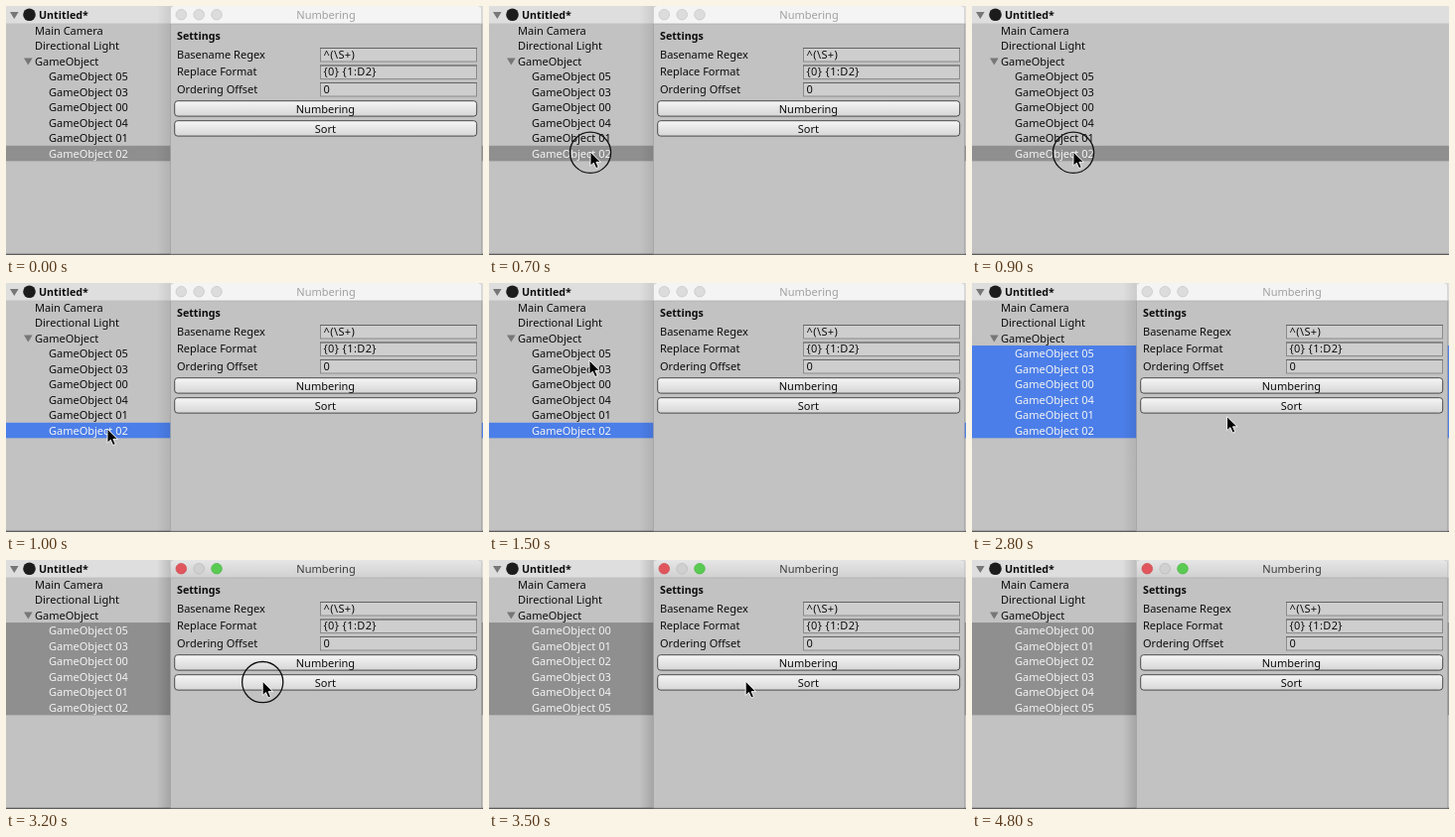
An HTML page for the animation above (5000 ms loop, 480 by 251 pixels).

```html
<!DOCTYPE html>
<html lang="en">
<head>
<meta charset="utf-8">
<title>Numbering and sorting objects</title>
<style>
  html, body { margin: 0; width: 100%; height: 100%; overflow: hidden; background: #c2c2c2; }
  svg { display: block; width: 100%; height: 100%; }
  text { font: 11px "Noto Sans", "Open Sans", sans-serif; fill: #0c0c0c; white-space: pre; }
  .bold { font-weight: 700; font-size: 10.7px; }
  .value { letter-spacing: .4px; }
  .mid { text-anchor: middle; }
</style>
</head>
<body>
<svg id="stage" viewBox="0 0 480 251" xmlns="http://www.w3.org/2000/svg">
  <defs>
    <linearGradient id="bar" x2="0" y2="1">
      <stop stop-color="#e6e6e6"/><stop offset="1" stop-color="#d0d0d0"/>
    </linearGradient>
    <linearGradient id="key" x2="0" y2="1">
      <stop stop-color="#f6f6f6"/><stop offset="1" stop-color="#d6d6d6"/>
    </linearGradient>
    <linearGradient id="shade">
      <stop stop-color="#000" stop-opacity="0"/><stop offset="1" stop-color="#000" stop-opacity=".15"/>
    </linearGradient>
  </defs>
  <rect width="480" height="251" fill="#c2c2c2"/>
  <rect width="480" height="17.5" fill="#dedede"/>
  <path d="M4 6h8.6l-4.3 7zM18 52.5h8.6l-4.3 7z" fill="#777"/>
  <circle cx="23.5" cy="8.7" r="6.3" fill="#1c1c1c"/>
  <text class="bold" x="33" y="13">Untitled*</text>
  <rect id="band" width="480"/>
  <g id="rows"></g>
  <rect y="249.7" width="480" height="1.3" fill="#5c5c5c"/>
  <g id="panel">
    <rect id="shadow" x="151.5" width="14" height="250" fill="url(#shade)"/>
    <path d="M165.5 250V4q0-4 4-4H474.6q4 0 4 4V250z" fill="#c2c2c2" stroke="#999" stroke-width=".6"/>
    <path id="titleBar" d="M165.5 18V4q0-4 4-4H474.6q4 0 4 4V18z"/>
    <path d="M165.5 18H478.6" stroke="#aaa" stroke-width=".7"/>
    <g id="lights" stroke-width=".7"></g>
    <text id="title" class="mid" x="322" y="13">Numbering</text>
    <text class="bold" x="172" y="33.7">Settings</text>
    <g id="form"></g>
  </g>
  <circle id="ring" r="20.6" fill="none" stroke="#111" stroke-width="1.3"/>
  <path id="cursor" d="M0 0V14.2L3.3 11.2L5.7 16.6L8.2 15.5L5.9 10.3H10.4Z"
        fill="#000" stroke="#fff" stroke-width=".9" stroke-linejoin="round"/>
</svg>
<script>
const LOOP = 5000, STEP = 100, PITCH = 15.55;
const $ = id => document.getElementById(id);

function add(parent, tag, attrs, label) {
  const el = document.createElementNS("http://www.w3.org/2000/svg", tag);
  set(el, attrs);
  if (label) el.textContent = label;
  parent.append(el);
  return el;
}
function set(el, attrs) {
  for (const k in attrs) el.setAttribute(k, attrs[k]);
}
const show = (el, on) => set(el, { visibility: on ? "visible" : "hidden" });

const row = (i, x, label) => add($("rows"), "text", { x, y: 28.5 + i * PITCH }, label);
row(0, 29, "Main Camera");
row(1, 29, "Directional Light");
row(2, 29, "GameObject");
const shuffled = [5, 3, 0, 4, 1, 2];
const items = shuffled.map((n, i) => row(i + 3, 43, ""));

[["Basename Regex", "^(\\S+)"], ["Replace Format", "{0} {1:D2}"], ["Ordering Offset", "0"]]
  .forEach(([label, value], i) => {
    const y = 42.5 + i * 17.5;
    add($("form"), "text", { x: 172, y: y + 10 }, label);
    add($("form"), "rect", { x: 316.5, y, width: 157, height: 13.5, fill: "#cecece", stroke: "#858585", "stroke-width": .9 });
    add($("form"), "path", { d: `M316 ${y}H474`, stroke: "#606060", "stroke-width": .9 });
    add($("form"), "text", { class: "value", x: 319.5, y: y + 10.2 }, value);
  });
["Numbering", "Sort"].forEach((label, i) => {
  const y = 95.7 + i * 20;
  add($("form"), "rect", { x: 169.7, y, width: 304, height: 15.4, rx: 3, fill: "url(#key)", stroke: "#4a4a4a", "stroke-width": 1 });
  add($("form"), "text", { class: "mid", x: 321.4, y: y + 11.8 }, label);
});
const lights = [176.3, 194.2, 212].map(cx => add($("lights"), "circle", { cx, cy: 8.7, r: 5.3 }));

// Cursor tip: [time, x, y]
const track = [
  [100, 258, 220], [300, 190, 190], [500, 112, 153], [600, 102, 147],
  [1200, 102, 147], [1300, 103, 132], [1400, 102, 100], [1500, 101, 78], [1700, 98.7, 71],
  [2400, 98.7, 71], [2500, 115, 80], [2600, 175, 108], [2700, 235, 130], [2800, 256.6, 134.5], [3000, 258.2, 122.3],
  [4400, 258.2, 122.3], [4500, 259, 129], [4600, 259, 162], [4700, 258, 214], [4800, 258, 256]
];
function cursorAt(t) {
  const i = track.findIndex(p => p[0] > t);
  if (i < 1) return null;
  const [a, b] = [track[i - 1], track[i]];
  const k = (t - a[0]) / (b[0] - a[0]);
  return [a[1] + (b[1] - a[1]) * k, a[2] + (b[2] - a[2]) * k];
}
const within = (t, from, to) => t >= from && t < to;

function draw(t) {
  const active = t >= 3200;
  const sorted = t >= 3300;
  const first = t >= 1900 ? 0 : 5;
  const focused = within(t, 1000, 3200);

  items.forEach((el, i) => {
    el.textContent = "GameObject 0" + (sorted ? i : shuffled[i]);
    el.style.fill = i >= first ? "#f4f4f4" : "#0c0c0c";
  });
  set($("band"), {
    y: 16.4 + (first + 3) * PITCH,
    height: (6 - first) * PITCH,
    fill: focused ? "#4b7ee8" : "#8f8f8f"
  });

  show($("panel"), !within(t, 800, 1000));
  set($("titleBar"), { fill: active ? "url(#bar)" : "#f4f4f4" });
  set($("shadow"), { opacity: active ? 1 : .55 });
  $("title").style.fill = active ? "#3a3a3a" : "#a0a0a0";
  const colors = active ? ["#e0565c", "#d0d0d0", "#5acb52"] : ["#dcdcdc", "#dcdcdc", "#dcdcdc"];
  const edges = active ? ["#c94a50", "#b8b8b8", "#4ab443"] : ["#c4c4c4", "#c4c4c4", "#c4c4c4"];
  lights.forEach((el, i) => set(el, { fill: colors[i], stroke: edges[i] }));

  const tip = cursorAt(t);
  const pressed = within(t, 700, 1000) || within(t, 1900, 2200) || within(t, 3100, 3400);
  show($("cursor"), tip);
  show($("ring"), tip && pressed);
  if (tip) {
    set($("cursor"), { transform: `translate(${tip})` });
    set($("ring"), { cx: tip[0], cy: tip[1] + .8 });
  }
}

const start = performance.now();
function tick() {
  const t = (performance.now() - start) % LOOP;
  draw(Math.floor(t / STEP) * STEP);
  requestAnimationFrame(tick);
}
tick();
</script>
</body>
</html>
```
